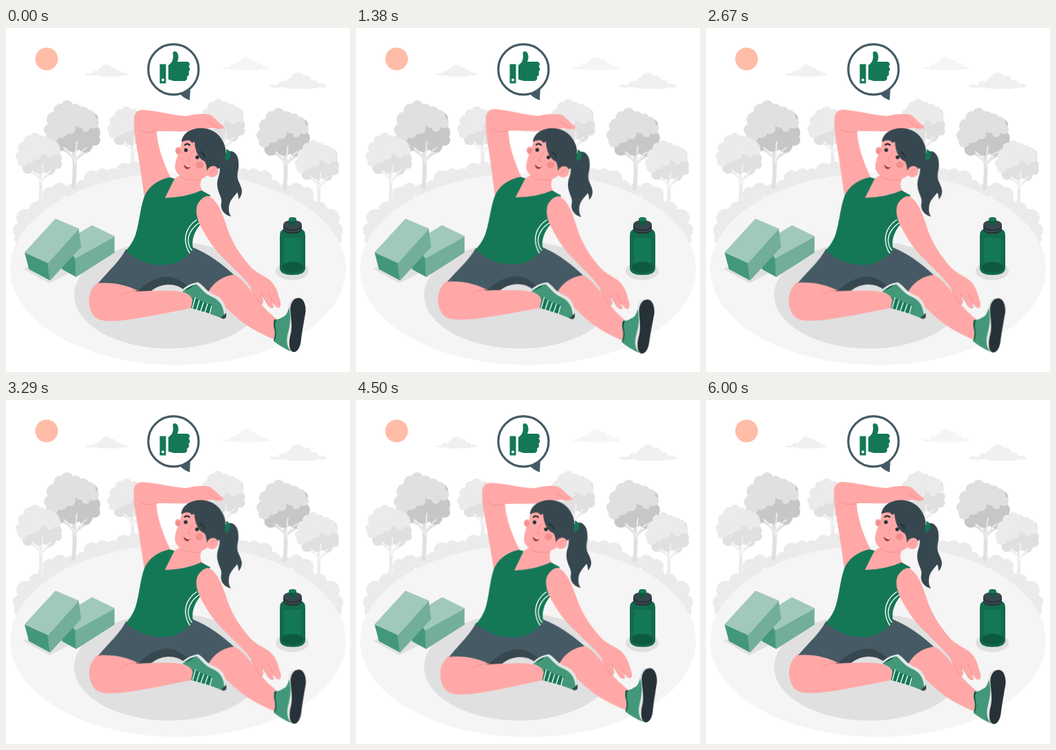
Write an HTML page without scripts that moves like this. It is 500 px wide and 500 px high and loops after 6040 ms.

```html
<!DOCTYPE html>
<html lang="en">
<head>
<meta charset="utf-8">
<title>Stretching</title>
<style>
  html, body { margin: 0; width: 100%; height: 100%; overflow: hidden; background: #fff; }
  svg { display: block; width: 100%; height: 100%; }
  .tree { --leaf: #ebebeb; --shade: #e0e0e0; --trunk: #ebebeb; --twig: #f5f5f5; }
  .tree.dark { --leaf: #e0e0e0; --shade: #c7c7c7; --trunk: #e0e0e0; --twig: #ebebeb; }
  .leaf { fill: var(--leaf); }
  .shade { fill: var(--shade); }
  .trunk, .twig { fill: none; stroke: var(--trunk); stroke-linecap: round; }
  .twig { stroke: var(--twig); }
  .skin { fill: #ffa8a7; }
  .fold { fill: none; stroke: #f28f8f; stroke-width: 1; stroke-linecap: round; }
  .green { fill: #147856; }
  .body { fill: #116b4c; }
  .deep { fill: #0e5a40; }
  .shoe { fill: #439879; }
  .slate { fill: #455a64; }
  .hair { fill: #37474f; }
  .ink { fill: #263238; }
  .pale { fill: #e4e6e6; }
  .blush { fill: #f28f8f; }
  .line { fill: none; stroke: #fff; stroke-width: 1.4; stroke-linecap: round; }
  .sway { transform-origin: 278px 296px; animation: sway 6040ms linear infinite; }
  @keyframes sway {
    0%, 100% { transform: rotate(0deg); }
    25% { transform: rotate(1deg); }
    75% { transform: rotate(-1deg); }
  }
</style>
</head>
<body>
<svg viewBox="0 0 500 500">
  <defs>
    <path id="cloud" d="M0 20C3 16 10 19 14 18C14 13 21 11 25 14C26 8 31 9 32 7C35-1 47-2 51 5C58 4 62 8 62 12C67 10 72 13 72 17C77 15 84 18 85 21C78 23 72 21 67 23C58 26 50 22 42 24C30 25 24 21 16 22C9 23 4 22 0 20Z"/>
    <g id="tree">
      <path class="trunk" stroke-width="6" d="M43 126Q46 104 44 75"/>
      <path class="trunk" stroke-width="3" d="M45 90Q52 78 66 74M44 86Q36 74 25 71"/>
      <g class="shade">
        <circle cx="71" cy="47" r="11"/><circle cx="74" cy="58" r="8"/>
        <circle cx="60" cy="65" r="11"/><circle cx="42" cy="62" r="13"/>
        <circle cx="22" cy="65" r="10"/><circle cx="30" cy="50" r="18"/>
        <circle cx="53" cy="47" r="19"/><circle cx="69" cy="27" r="10"/>
      </g>
      <g class="leaf">
        <circle cx="34" cy="9" r="9"/><circle cx="24" cy="15" r="10"/>
        <circle cx="46" cy="14" r="9"/><circle cx="57" cy="18" r="9"/>
        <circle cx="66" cy="23" r="9"/><circle cx="72" cy="33" r="8"/>
        <circle cx="15" cy="28" r="11"/><circle cx="34" cy="27" r="16"/>
        <circle cx="54" cy="28" r="12"/><circle cx="9" cy="43" r="9"/>
        <circle cx="12" cy="53" r="9"/><circle cx="24" cy="44" r="11"/>
        <circle cx="38" cy="41" r="8"/><circle cx="61" cy="40" r="6"/>
      </g>
      <path class="twig" stroke-width="2" d="M45 92Q50 76 62 69M45 88Q36 72 29 69M45 92L48 60"/>
    </g>
    <g id="bushes" fill="#ebebeb">
      <circle cx="21" cy="294" r="11"/><circle cx="28" cy="276" r="13"/>
      <circle cx="22" cy="306" r="10"/><circle cx="46" cy="265" r="13"/>
      <circle cx="43" cy="283" r="17"/><circle cx="64" cy="242" r="11"/>
      <circle cx="78" cy="236" r="11"/><circle cx="69" cy="254" r="17"/>
      <circle cx="95" cy="238" r="11"/><circle cx="112" cy="232" r="11"/>
      <circle cx="125" cy="219" r="12"/><circle cx="140" cy="214" r="10"/>
      <circle cx="155" cy="216" r="12"/><circle cx="171" cy="207" r="11"/>
      <circle cx="187" cy="205" r="11"/><circle cx="202" cy="213" r="11"/>
      <path d="M95 245L125 222L200 210V235H90Z"/>
    </g>
  </defs>

  <circle cx="59" cy="45" r="16.5" fill="#ffbca7"/>
  <g fill="#f0f0f0">
    <use href="#cloud" transform="translate(115 53) scale(.73)"/>
    <use href="#cloud" fill="#f5f5f5" transform="translate(314 42) scale(.82)"/>
    <use href="#cloud" transform="translate(382 64.500)"/>
  </g>

  <use href="#bushes"/>
  <use href="#bushes" transform="matrix(-1 0 0 1 500 0)"/>
  <use class="tree" href="#tree" transform="translate(147 114) scale(.83 .75)"/>
  <use class="tree" href="#tree" transform="translate(281 103) scale(.81)"/>
  <use class="tree dark" href="#tree" transform="translate(55 105)"/>
  <use class="tree" href="#tree" transform="translate(14 152) scale(.82 .8)"/>
  <use class="tree dark" href="#tree" transform="translate(364 116) scale(.95 .93)"/>
  <use class="tree" href="#tree" transform="translate(420 163) scale(.78 .77)"/>

  <ellipse cx="250" cy="350" rx="244" ry="140" fill="#f5f5f5"/>
  <ellipse cx="237" cy="388" rx="138" ry="78" fill="#e0e0e0"/>

  <!-- blocks -->
  <path fill="#e0e0e0" d="M25 350L34 346L109 334L100 352L63 371Z"/>
  <g stroke-linejoin="round" stroke-width="1.500">
    <path fill="#439879" stroke="#439879" d="M82 322L101 334L102 361L82 350Z"/>
    <path fill="#72ae99" stroke="#72ae99" d="M101 334L157 303V326L102 361Z"/>
    <path fill="#a1c9bb" stroke="#a1c9bb" d="M82 314L125 287.500L157 303L101 334Z"/>
    <path fill="#439879" stroke="#439879" d="M28 327L61 341L64 366L34 350Z"/>
    <path fill="#72ae99" stroke="#72ae99" d="M61 341L105 292L108.500 318L64 366Z"/>
    <path fill="#a1c9bb" stroke="#a1c9bb" d="M28 326L72 278L105 292L61 341Z"/>
  </g>

  <!-- bottle -->
  <ellipse cx="416" cy="353" rx="24" ry="13.500" fill="#e0e0e0"/>
  <path class="body" d="M398 302Q398 294 404 292H429Q435 294 435 302V349Q435 359 416.500 359Q398 359 398 349Z"/>
  <path class="green" d="M404 305H429V342Q416 338 404 342Z"/>
  <ellipse cx="416.500" cy="348" rx="16" ry="8" class="deep"/>
  <path class="ink" d="M403 286H430V294Q427 299 416.500 299Q406 299 403 294Z"/>
  <ellipse cx="416.500" cy="286" rx="13.500" ry="7" class="hair"/>
  <path fill="none" stroke="#50626c" d="M403 291Q406 296 416.500 296Q427 296 430 291"/>
  <path class="deep" d="M411 278Q411 275 416.500 275Q422 275 422 278L420 286Q416 288 413 286Z"/>
  <ellipse cx="416.500" cy="278" rx="5.500" ry="2.800" class="green"/>

  <!-- speech bubble -->
  <path class="slate" d="M252 95L268 87L267 105Q258 102 252 95Z"/>
  <circle cx="243.400" cy="60.200" r="36.600" fill="#fff" stroke="#455a64" stroke-width="3.200"/>
  <path class="green" d="M223.500 52.500H232.500V80.500H223.500Z"/>
  <circle cx="228" cy="75.500" r="2" fill="#fff"/>
  <path class="green" d="M236 54C241 51 244 46 242.500 37C242 33 248 33 249.500 37C251 41 251 45 249 49H263C268 49 268 55 265 56C268 57 268 63 265 63.500C267 65 266 70 263 70.500C264 73 263 77 259 77H246C241 77 239 75 236 75Z"/>

  <g class="sway">
    <!-- outstretched leg -->
    <path class="skin" d="M288 374Q302 357 330 358C346 364 361 389 374 405C381 413 388 418 394 424L391 453C378 448 357 438 343 427C324 412 309 395 294 381Z"/>
    <path class="shoe" d="M390 424Q397 424 402 420Q410 418 412 400L419 394L414 470Q400 464 389 455Q393 445 391 437Q388 431 390 424Z"/>
    <path class="deep" d="M390 424L393 423.500Q390 431 392 438Q394 448 390 455L389 454Q392 445 390 437Q388 431 390 424Z"/>
    <path class="pale" d="M422 392Q411 392 411 406C415 420 413 432 409 447Q406 464 416 471L424 455Z"/>
    <path class="ink" d="M424 392.500C432 391 436 402 435.500 412C434 422 431 437 429 452C428 465 423 471.500 418 471C411 470 411 457 413 448C417 435 414 423 413.500 413C412 402 417 393 424 392.500Z"/>

    <!-- bent leg -->
    <path class="skin" d="M135 369C119 379 117 401 126 416C133 428 151 427 178 424C211 419 244 412 270 407L274 391C262 384 247 381 225 382H194L163 367Z"/>
    <path class="hair" d="M188 383C205 369 217 358 238 357Q260 360 270 376L259 381Q249 372 234 373Q221 374 211 382Z"/>
    <path class="slate" d="M174 322C166 338 150 352 134 371C156 369 176 374 192 382C207 369 220 361 236 361.500C247 362 257 369 264 375C272 370 283 376 294 384C301 370 314 361 331 358.500C314 343 294 328 272 319Z"/>
    <path class="fold" stroke-width="2" d="M168 388Q178 382 192 381.500"/>

    <!-- near shoe -->
    <path class="deep" d="M257 381Q264 374 276 370Q282 373 286 380L276 394Q269 382 257 381Z"/>
    <path class="shoe" d="M257 382C262 381 267 379 273 374L281 371C289 379 294 386 304 390Q318 395 320 414Q320 423 314 422C300 416 284 411 269 407C275 395 269 387 257 384Z"/>
    <path class="pale" d="M256 381C262 374 270 371 279 369.500C288 374 291 384 304 388C314 392 320 402 320 416L317 417C316 404 311 396 300 391C288 386 285 379 277 372.500C269 374 263 378 258 382Z"/>
    <path class="green" d="M272 391Q282 397 301 403L297 415L269 407Z"/>
    <path class="line" stroke-width="1.800" d="M275 392L271 407M281 396L277 409M287 399L283 411M293 401L289 413M299 404L296 415"/>
    <path class="hair" d="M320 414L312 421Q317 425 320 420Z"/>

    <!-- raised arm -->
    <path class="skin" d="M201 244C198 224 194 196 190 172Q186 151 186 134Q186 119 199 119C219 120 242 127 262 128C274 125 287 124 296 126C303 129 307 136 313 140Q319 144 315 146Q309 148 299 145Q286 149 270 150C251 151 235 150 219 150C220 172 229 196 239 217L236 250Z"/>
    <path class="fold" d="M195 148Q205 155 219 150M293 135Q301 142 309 144"/>

    <!-- torso -->
    <path class="skin" d="M245 219L256 212L288 214Q279 226 285 236L297 244L262 253L230 248Z"/>
    <path class="fold" stroke-width="3" d="M254 216Q264 223 281 221"/>
    <path class="green" d="M238 217C222 220 207 230 201 245C195 262 194 281 189 298C186 308 181 316 174 324C190 337 208 344 225 344.500C243 345 259 339 272 321C269 308 274 296 282 286L297 243L284 236Q263 246 231 247Q237 235 245 219Z"/>
    <path class="line" d="M277 279C265 287 260 299 261 310Q262 320 267 327M281 283C269 291 264 302 265 311Q266 319 270 323"/>

    <!-- lowered arm -->
    <path class="skin" d="M294 244C307 250 313 266 319 283C327 310 338 326 352 343C361 355 374 359 383 366C392 374 395 384 397 392Q401 402 398 406Q394 408 390 402L386 398L389 405Q386 409 381 403L371 386Q371 393 373 398Q372 403 368 399Q362 391 357 379C350 366 335 354 322 340C306 326 294 309 285 292C276 276 273 259 283 250Q287 245 294 244Z"/>
    <path class="fold" d="M371 386Q371 393 373 398Q372 403 368 399Q362 391 357 379M371 386L381 403Q386 409 389 405M389 401L381 384"/>

    <!-- head -->
    <path class="hair" d="M320 181C330 175 338 184 338 196C339 205 335 211 337 220C340 229 346 235 341 245L338 249Q338 242 336 239C331 246 325 250 324 260Q323 268 327 274C316 271 311 263 313 254C315 247 307 239 307 227C307 216 313 212 310 200Z"/>
    <path class="skin" d="M261 158Q253 169 254 174Q247 171 246 178Q246 183 250 184C247 192 244 202 247 208C252 217 264 221 276 220C285 220 290 217 293 214C301 221 310 214 308 205L302 176Q286 155 261 158Z"/>
    <path class="hair" d="M255 166C256 153 269 145 286 145.500C302 147 313 156 318 171C322 186 318 199 308 205Q305 199 298 201Q293 204 292 208Q292 199 289 194C280 190 275 180 274 165Q270 169 268 164Q261 162 255 166Z"/>
    <path class="green" d="M320 176Q327 178 326 185Q325 191 320 193Q317 188 319 185Q321 181 320 176Z"/>
    <ellipse class="blush" cx="250.500" cy="179" rx="3.500" ry="4"/>
    <ellipse class="blush" cx="281.500" cy="199" rx="5.500" ry="5"/>
    <circle class="ink" cx="261.500" cy="177.500" r="2.700"/>
    <circle class="ink" cx="278" cy="188" r="2.700"/>
    <path fill="none" stroke="#263238" stroke-width="2.200" stroke-linecap="round" d="M260 170Q263 167 267 170M283 180Q287 182 289 187"/>
    <path class="fold" d="M271 180L264 193Q266 195 269 194M297 211Q299 205 304 205"/>
    <path fill="#a93f49" d="M258 199Q263 201 268 201Q267 206 262 205Q259 203 258 199Z"/>
    <path fill="#fff" d="M259 199.500L267.500 201L266 202.500Z"/>
  </g>
</svg>
</body>
</html>
```
